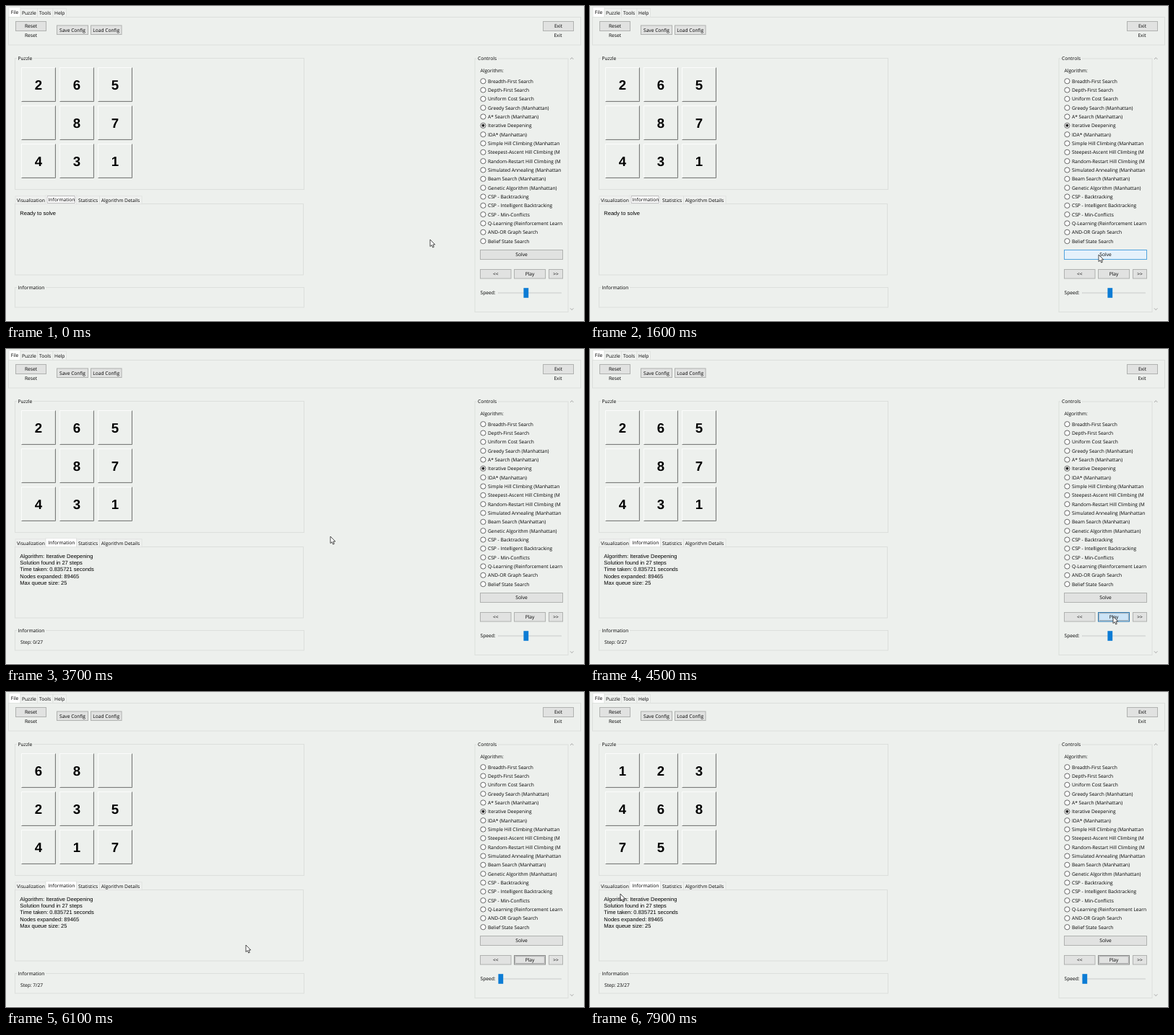
An HTML page that plays this animation: 800 px wide and 437 px high, repeating every 8 s.

```html
<!DOCTYPE html>
<html lang="en">
<head>
<meta charset="utf-8">
<title>8-puzzle solver</title>
<style>
  html, body { margin: 0; width: 100%; height: 100%; overflow: hidden; background: #edf0ed; }
  svg { display: block; width: 100vw; height: 100vh; }
  text { font: 6.65px "Open Sans", sans-serif; fill: #000; white-space: pre; text-rendering: geometricPrecision; }
  .mid { text-anchor: middle; }
  .legend { stroke: #edf0ed; stroke-width: 4px; paint-order: stroke; }
  .mono { font: 7.53px "Liberation Sans", sans-serif; }
  .digit { font: bold 18.6px "Liberation Sans", sans-serif; text-anchor: middle; }
  .box { fill: none; stroke: #dcdfdc; }
  .button { fill: #e1e2e1; stroke: #b0b2b0; }
  .focus { fill: none; stroke: #8b8b8d; stroke-width: .6; }
</style>
</head>
<body>
<svg id="stage" viewBox="0 0 800 437" preserveAspectRatio="none"></svg>
<script>
const LOOP = 8000, FRAME = 100;
const SOLVE_DOWN = 1800, SOLVED = 2700, PLAY_DOWN = 4500, DRAG = 5000, DROP = 5600;
const stage = document.getElementById('stage');
const $ = id => document.getElementById(id);

const label = (x, y, s, cls = '', id = '') =>
  `<text x="${x}" y="${y + 2.4}" class="${cls}" id="${id}">${s}</text>`;
const rect = (x, y, w, h, attrs) =>
  `<rect x="${x}" y="${y}" width="${w}" height="${h}" ${attrs}/>`;
const path = (d, attrs) => `<path d="${d}" ${attrs}/>`;
const group = (x, y, w, h, title) =>
  rect(x, y, w, h, 'class="box"') + label(x + 4, y, title, 'legend');

const buttons = {
  reset: [13.5, 21.5, 42, 13, 'Reset'],
  exit: [743.5, 21.5, 42, 13, 'Exit'],
  save: [70.5, 27, 43, 12.5, 'Save Config'],
  load: [117.5, 27, 42.5, 12.5, 'Load Config'],
  solve: [656.5, 338.5, 114, 13, 'Solve'],
  back: [656.5, 365.5, 42.5, 12.5, '&lt;&lt;'],
  play: [703.5, 365.5, 43, 12.5, 'Play'],
  next: [751.5, 365.5, 19, 12.5, '&gt;&gt;']
};
const button = ([id, [x, y, w, h, s]]) =>
  rect(x, y, w, h, `id="${id}" class="button"`) +
  rect(x + 1.3, y + 1.3, w - 2.6, h - 2.6, `id="${id}-focus" class="focus" visibility="hidden"`) +
  label(x + w / 2, y + h / 2, s, 'mid');

// The selected tab is white and stands a little higher than the rest.
function tabs(y, h, selected, list) {
  return list.map(([x, w, pad, s], i) => {
    const on = i === selected, top = on ? y - 1.5 : y;
    return rect(x, top, w, y + h - top, `fill="${on ? '#fff' : '#eff1ef'}" stroke="#dcdfdc" stroke-width=".7"`) +
      label(x + pad, y + h / 2 - (on ? .8 : 0), s);
  }).join('');
}

const algorithms = [
  'Breadth-First Search', 'Depth-First Search', 'Uniform Cost Search',
  'Greedy Search (Manhattan)', 'A* Search (Manhattan)', 'Iterative Deepening',
  'IDA* (Manhattan)', 'Simple Hill Climbing (Manhattan',
  'Steepest-Ascent Hill Climbing (M', 'Random-Restart Hill Climbing (M',
  'Simulated Annealing (Manhattan', 'Beam Search (Manhattan)',
  'Genetic Algorithm (Manhattan)', 'CSP - Backtracking',
  'CSP - Intelligent Backtracking', 'CSP - Min-Conflicts',
  'Q-Learning (Reinforcement Learn', 'AND-OR Graph Search', 'Belief State Search'
];
const radio = (s, i) => {
  const y = 104.2 + i * 12.33;
  return `<circle cx="660.4" cy="${y}" r="3.6" fill="#fff" stroke="#444" stroke-width=".8"/>` +
    (i === 5 ? `<circle cx="660.4" cy="${y}" r="2" fill="#222"/>` : '') + label(667, y, s);
};

function tile(i) {
  const x = Math.floor(21.6 + i % 3 * 52.7) + .5;
  const y = Math.floor(85.8 + Math.floor(i / 3) * 52.7) + .5, s = 47;
  return path(`M${x} ${y + s}V${y}H${x + s}`, 'fill="none" stroke="#fbfcfb"') +
    path(`M${x + 1} ${y + s - 1}H${x + s - 1}V${y + 1}`, 'fill="none" stroke="#d2d4d2" stroke-width=".6"') +
    path(`M${x} ${y + s}H${x + s}V${y}`, 'fill="none" stroke="#7b7d7b"') +
    `<text id="tile${i}" class="digit" x="${x + 23.5}" y="${y + 30.4}"></text>`;
}

const report = ['Algorithm: Iterative Deepening', 'Solution found in 27 steps',
  'Time taken: 0.835721 seconds', 'Nodes expanded: 89465', 'Max queue size: 25'];

stage.innerHTML =
  '<clipPath id="clip"><path d="M650 90H770V335H650Z"/></clipPath>' +
  rect(0, 436, 800, 1, 'fill="#fbfcfb"') +
  rect(3.5, 15.5, 792, 38.5, 'class="box"') +
  tabs(3.2, 12.3, 0, [[4, 16, 2.8, 'File'], [20, 23.5, 2, 'Puzzle'], [43.5, 21.5, 2.5, 'Tools'], [65, 18.5, 2, 'Help']]) +
  label(34.5, 41, 'Reset', 'mid') + label(764, 41, 'Exit', 'mid') +
  group(12.5, 72.5, 400, 182, 'Puzzle') +
  [...Array(9).keys()].map(tile).join('') +
  rect(12.5, 274.5, 399, 98.5, 'class="box"') +
  tabs(263.8, 11, 1, [[13, 42, 2, 'Visualization'], [55, 42.5, 3.5, 'Information'],
    [97.5, 32, 2.5, 'Statistics'], [129.5, 58.5, 2.3, 'Algorithm Details']]) +
  rect(57, 263.8, 38.6, 9.4, 'id="tab-focus" class="focus"') +
  label(19.3, 287.2, 'Ready to solve', 'mono', 'ready') +
  '<g id="report">' + report.map((s, i) => label(19.3, 287.2 + i * 9.37, s, 'mono')).join('') + '</g>' +
  group(12.5, 390.5, 400, 27.5, 'Information') + label(20, 407, '', '', 'step') +
  group(649, 73, 129, 351.5, 'Controls') + label(656.5, 90, 'Algorithm:') +
  '<g clip-path="url(#clip)">' + algorithms.map(radio).join('') + '</g>' +
  Object.entries(buttons).map(button).join('') +
  label(656.5, 398, 'Speed:') +
  rect(681.5, 397.3, 87, 1.5, 'fill="#e4e7e5" stroke="#d3d6d4" stroke-width=".6"') +
  rect(-3.6, 391.2, 6.8, 13.6, 'id="knob"') +
  path('M781 74L783.2 71.6L785.4 74M781 419.3L783.2 421.7L785.4 419.3', 'fill="none" stroke="#999" stroke-width=".8"') +
  path('M0 0V9.6L2.2 7.6L3.7 11L5.3 10.3L3.9 7H6.8Z', 'id="cursor" fill="#fff" stroke="#222" stroke-width=".8"');

// Every board along the solution, each move naming where the blank goes.
const offsets = { U: -3, D: 3, L: -1, R: 1 };
const boards = [['2', '6', '5', '', '8', '7', '4', '3', '1']];
for (const move of 'URDDRUULDDRUULDLURDLDRRULDR') {
  const board = boards[boards.length - 1].slice();
  const blank = board.indexOf(''), other = blank + offsets[move];
  [board[blank], board[other]] = [board[other], ''];
  boards.push(board);
}

function stepAt(t) {
  if (t < 4700) return 0;
  if (t < 5200) return 1;
  return Math.max(2, 13 + Math.floor((t - 6720) / 110));
}

const cursorPath = [
  [0, 587, 324], [500, 704, 345], [2700, 704, 345], [3400, 449, 260], [3750, 449, 260],
  [4300, 724, 371], [4650, 724, 371], [4900, 720, 398], [5050, 718, 398],
  [5400, 602, 401], [5600, 590, 399], [6600, 74, 303], [6800, 73, 301.5], [7900, 42, 280]
];
function cursorAt(t) {
  const i = Math.max(1, cursorPath.findIndex(p => p[0] >= t));
  const [t0, x0, y0] = cursorPath[i - 1], [t1, x1, y1] = cursorPath[i];
  const u = (t - t0) / (t1 - t0), k = u * u * (3 - 2 * u);
  return [x0 + (x1 - x0) * k, y0 + (y1 - y0) * k];
}

const show = (id, on) => $(id).setAttribute('visibility', on ? 'visible' : 'hidden');

function styleButton(id, cx, cy, pressed, focused) {
  const [x, y, w, h] = buttons[id];
  const hover = cx > x && cx < x + w && cy > y && cy < y + h;
  const [fill, stroke] = pressed ? ['#cce4f7', '#2f78ae'] : hover ? ['#e5f1fb', '#52a4de']
    : ['#e1e2e1', focused ? '#8c8e8c' : '#b0b2b0'];
  $(id).style.fill = fill;
  $(id).style.stroke = stroke;
  show(id + '-focus', focused);
}

function draw(t) {
  const [x, y] = cursorAt(t), step = stepAt(t), solved = t >= SOLVED;
  $('cursor').setAttribute('transform', `translate(${x} ${y})`);

  const solving = t >= SOLVE_DOWN && !solved;
  styleButton('solve', x, y, solving, solving);
  styleButton('play', x, y, t >= PLAY_DOWN && t < PLAY_DOWN + FRAME, t >= PLAY_DOWN);
  show('tab-focus', t < SOLVE_DOWN);
  show('ready', !solved);
  show('report', solved);

  $('step').textContent = solved ? `Step: ${step}/27` : '';
  boards[step].forEach((n, i) => { $('tile' + i).textContent = n; });

  const dragging = t >= DRAG && t < DROP;
  const knobX = t < DRAG ? 720 : dragging ? Math.min(720, Math.max(685, x)) : 685;
  $('knob').setAttribute('transform', `translate(${knobX} 0)`);
  $('knob').setAttribute('fill', dragging ? '#cbcdcb' : '#0c7cd5');
}

function tick(now) {
  draw(Math.floor(now % LOOP / FRAME) * FRAME);
  requestAnimationFrame(tick);
}
draw(0);
requestAnimationFrame(tick);
</script>
</body>
</html>
```
